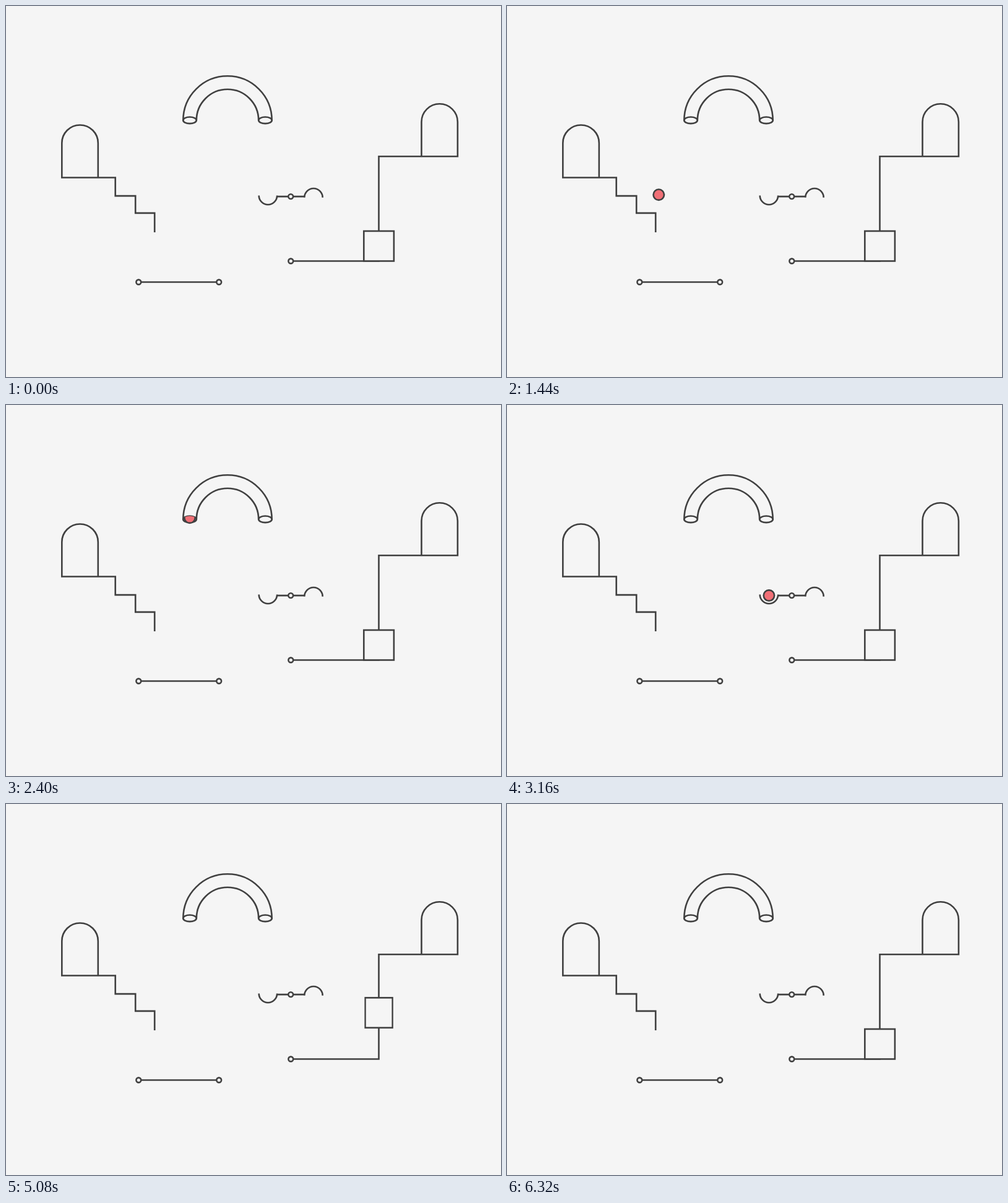
Animation, 800 px wide and 600 px high, one loop 6.48 s. Source, as an HTML page:

```html
<!DOCTYPE html>
<html lang="en">
<head>
<meta charset="utf-8">
<title>Ball run</title>
<style>
  html, body { margin: 0; width: 100%; height: 100%; overflow: hidden; background: #f5f5f5; }
  svg { display: block; width: 800px; height: 600px; }
  .line { fill: none; stroke: #404040; stroke-width: 2.6; }
  .solid { fill: #f5f5f5; }
</style>
</head>
<body>
<svg viewBox="0 0 800 600">
  <defs>
    <!-- hides the ball behind the door walls and inside the tube -->
    <clipPath id="open">
      <path d="M91.6 600V0H286.2V184.8A10.8 5.3 0 0 1 307.8 184.8H408.2A10.8 5.3 0 0 1 429.8 184.8V0H728.6V600Z"/>
    </clipPath>
  </defs>

  <g class="line">
    <path d="M148.8 277.5V221.7A29.25 29.25 0 0 0 90.3 221.7V277.5H176.7V307.1H209.2V334.9H240.2V366"/>
    <path d="M286.3 185A71.7 71.7 0 0 1 429.7 185M307.8 185A50.2 50.2 0 0 1 408.2 185"/>
    <ellipse cx="297" cy="184.8" rx="10.8" ry="5.3"/>
    <ellipse cx="419" cy="184.8" rx="10.8" ry="5.3"/>
    <path d="M464 412.5H602.5V243.2H729.9V187.5A29.2 29.2 0 0 0 671.5 187.5V243.2"/>
    <circle cx="460.3" cy="412.5" r="3.9"/>
    <path id="net"/>
    <circle cx="214.3" cy="446.5" r="3.9"/>
    <circle cx="344.2" cy="446.5" r="3.9"/>
    <g id="seesaw">
      <path d="M-51.5 -1.6A14.7 14.7 0 0 0 -22.1 -1.6V0H-4M4 0H22.1V1.6A14.7 14.7 0 0 1 51.5 1.6"/>
      <circle r="3.9"/>
    </g>
  </g>

  <g clip-path="url(#open)">
    <circle id="fill" r="8.7" fill="#f16f76"/>
    <circle id="ring" r="8.7" class="line"/>
  </g>

  <rect id="lift" class="line solid" x="-24.3" y="-48.5" width="48.6" height="48.5"/>
</svg>

<script>
const LOOP = 6480, STEP = 40;
const GRAVITY = 0.00122; // half the acceleration, px/ms²
const PIVOT = { x: 460.2, y: 308.1 }, ARM = 36.8;
const LIFT_X = 602.6, LOW = 412.5, HIGH = 243.2;
const REST = 10.8; // ball centre above its floor

const sine = p => (1 - Math.cos(Math.PI * p)) / 2;
const quart = p => p < 0.5 ? 8 * p ** 4 : 1 - 8 * (1 - p) ** 4;
const out = p => 1 - (1 - p) ** 1.5;

// Progress from 0 to 1 between two times.
function ramp(t, from, to, ease = p => p) {
  return ease(Math.min(1, Math.max(0, (t - from) / (to - from))));
}
// A single swell from 0 to 1 and back.
const bump = (t, from, to) => Math.sin(Math.PI * ramp(t, from, to));
// Height of a throw whose top is at the given height and time.
const arc = (t, top, time) => top + GRAVITY * (t - time) ** 2;

const HIT = 1697, DEEP = 1805, LEAVE = 1913; // ball on the net
const SAG = 74;
const netSag = t => t < DEEP
  ? SAG * Math.sin(Math.PI / 2 * ramp(t, HIT, DEEP))
  : SAG * Math.cos(Math.PI / 2 * ramp(t, DEEP, 2089));

const tilt = t => 189.5 * ramp(t, 3380, 4100, sine) - 9.5 * ramp(t, 4120, 4420, sine);

const liftY = t =>
  LOW + (HIGH - LOW) * (ramp(t, 4766, 5480, quart) - ramp(t, 5820, 6340, quart));

function ballAt(t) {
  // out of the door, then down the stairs; arcs meet where the ball bounces
  if (t < 683) return [80 + 0.157 * (t - 20), 266.5];
  const drift = 198 + 0.0787 * (t - 840);
  if (t < HIT) {
    return [drift, Math.min(arc(t, 266.5, 683), arc(t, 269, 990), arc(t, 297, 1358))];
  }
  // net and tube
  if (t < LEAVE) return [drift, 436 + SAG * bump(t, HIT, LEAVE)];
  if (t < 2700) {
    return [282.5 + 14.5 * ramp(t, LEAVE, 2240, out), 436 - 268 * ramp(t, LEAVE, 2480, out)];
  }
  if (t < 3380) {
    return [419 + 4.4 * ramp(t, 2860, 3150), Math.min(PIVOT.y, arc(Math.max(t, 2811), 168, 2811))];
  }
  // round with the seesaw, then along the lower floor
  if (t < 3960) {
    const a = tilt(t) * Math.PI / 180;
    return [PIVOT.x - ARM * Math.cos(a), PIVOT.y + ARM * Math.sin(a)];
  }
  if (t < 4740) {
    const x = Math.min(LIFT_X, 517.5 + 0.135 * (t - 4120));
    return [x, Math.min(LOW - REST, arc(t, 308, 3916), arc(t, 386, 4306))];
  }
  // up with the lift and into the door
  if (t < 5480) return [LIFT_X, liftY(t) - REST];
  return [LIFT_X + 0.165 * (t - 5480), HIGH - REST];
}

// The colour slips out of its ring when the ball is jolted.
function slipAt(t) {
  const drop = bump(t, 4040, 4200);
  return [2.7 * drop, 11.5 * drop + 5 * bump(t, 1800, 2040) + 1.5 * bump(t, 780, 900)];
}

const [net, seesaw, lift, ring, fill] =
  ["net", "seesaw", "lift", "ring", "fill"].map(id => document.getElementById(id));

function place(node, x, y, extra = "") {
  node.setAttribute("transform", `translate(${x} ${y}) ${extra}`);
}

function draw(t) {
  const [x, y] = ballAt(t), [dx, dy] = slipAt(t);
  place(ring, x, y);
  place(fill, x + dx, y + dy);

  place(seesaw, PIVOT.x, PIVOT.y, `rotate(${-tilt(t)})`);
  net.setAttribute("d", `M218.3 446.5Q281 ${446.5 + 2 * netSag(t)} 340.6 446.5`);

  // The lift gets narrower the faster it travels.
  const speed = Math.abs(liftY(t + 10) - liftY(t - 10)) / 20;
  place(lift, LIFT_X, liftY(t), `scale(${1 - 0.145 * Math.min(speed, 1)} 1)`);
}

const start = performance.now();
function tick(now) {
  const t = Math.max(0, now - start) % LOOP;
  draw(Math.floor(t / STEP) * STEP);
  requestAnimationFrame(tick);
}
draw(0);
requestAnimationFrame(tick);
</script>
</body>
</html>
```
